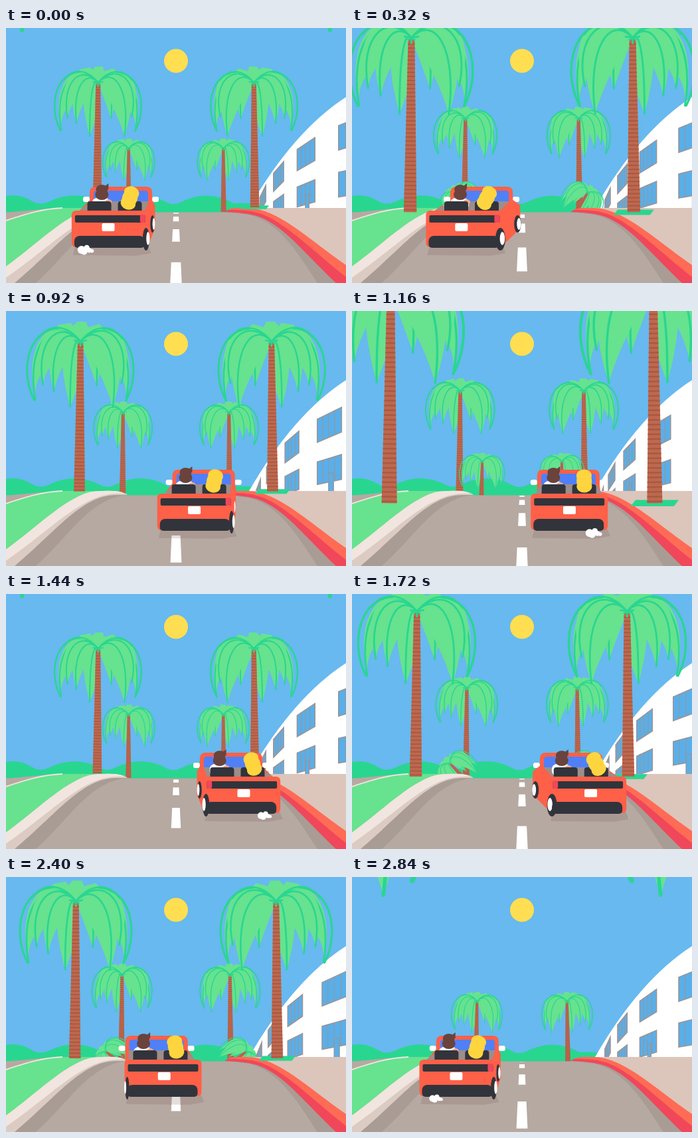
An HTML page with a canvas that plays this animation: 512 px wide and 384 px high, repeating every 2.88 s.

```html
<!DOCTYPE html>
<html lang="en">
<head>
<meta charset="utf-8">
<title>Palm drive</title>
<style>
  html, body { margin: 0; width: 100%; height: 100%; overflow: hidden; background: #67b9ef; }
  canvas { display: block; width: 512px; height: 384px; }
</style>
</head>
<body>
<canvas id="stage" width="512" height="384"></canvas>
<script>
const ctx = document.getElementById('stage').getContext('2d');
const LOOP = 2880, STEP = 40, TREE_GAP = 720, OLDEST = 2300;
const MID = 256, TAU = Math.PI * 2;
const SKY = '#67b9ef', GREEN = '#67e28f', DEEP = '#29d690', ROAD = '#b6a9a2', SHADE = '#a99c95';
const RED = '#ff6048', CRIMSON = '#f0475a', DARK = '#32343c', HAIR = '#6a433c', BLOND = '#ffd53f';

function shape(d, fill, stroke, width = 1) {
  const p = new Path2D(d);
  if (fill) { ctx.fillStyle = fill; ctx.fill(p); }
  if (stroke) { ctx.strokeStyle = stroke; ctx.lineWidth = width; ctx.stroke(p); }
}
const poly = (points, ...paint) => shape('M' + points.join('L') + 'Z', ...paint);
function oval(x, y, rx, ry, fill, turn = 0) {
  ctx.beginPath();
  ctx.ellipse(x, y, rx, ry, turn, 0, TAU);
  ctx.fillStyle = fill;
  ctx.fill();
}
function box(x, y, w, h, r, fill) {
  ctx.beginPath();
  ctx.roundRect(x, y, w, h, r);
  ctx.fillStyle = fill;
  ctx.fill();
}

// Tip and fullness of each leaf, for a crown one unit wide.
const LEAVES = [
  [-.41, .54, .01], [.42, .54, .01], [-.34, .40, .05], [.38, .38, .05],
  [-.24, .46, .06], [.15, .40, .07], [-.09, .60, .11], [.30, .60, .10]
];

function leaf([x, y, belly]) {
  const side = Math.sign(x), b = side * belly, rise = .04 + Math.abs(x) * .6;
  const rib = (f, dx, dy) => `C${x * .6 + f * b} ${-rise + dy} ${x * 1.28 + f * b + dx} ${y * .3 - rise * .6 + dy} ${x} ${y}`;
  shape(`M0 0${rib(1, 0, 0)}C${x * 1.1 - b} ${y * .6} ${x * .6 - b} ${y * .15} 0 0Z`, GREEN);
  shape(`M0 0${rib(0, -side * .02, .03)}`, null, DEEP, .015);
}

function crown() {
  shape('M-.24-.1L-.2-.15L-.09-.17L-.07-.14L-.03-.18L.05-.18L.07-.13L.17-.16L.26-.08L.14.08L-.14.08Z', GREEN);
  ctx.lineCap = 'round';
  LEAVES.forEach(leaf);
  for (const s of [-1, 1]) {
    shape(`M0 0C${s * .12}-.15 ${s * .28}-.17 ${s * .38}-.03`, null, DEEP, .014);
    shape(`M${s * .2}-.12C${s * .5}-.1 ${s * .55} .3 ${s * .42} .54`, null, DEEP, .018);
  }
}

// A palm springs up behind the crest, then grows with perspective as it nears.
function growth(age) {
  const width = 145000 / (2522 - age);
  const far = Math.max(0, 1440 - age), near = Math.max(0, age - 1440);
  const swing = 47 * Math.exp((303 - age) / 165) * Math.cos(TAU * (age - 303) / 530);
  return {
    width,
    topX: -.875 * width - swing,
    topY: 243 - 1.2 * width + far ** 2 / 15000,
    footX: -.885 * width - swing / 2,
    footY: 270 + far / 100 + (near / 164) ** 3
  };
}

function palm(age, side) {
  const { width: w, topX, topY, footX, footY } = growth(age);
  ctx.save();
  ctx.translate(MID, 0);
  ctx.scale(side, 1);
  if (side < 0 && age > 1400) {
    const pw = w * .16, ph = w * .021;
    poly([[footX - pw, footY - ph], [footX + pw * .8, footY - ph], [footX + pw, footY + ph], [footX - pw * .8, footY + ph]], DEEP);
  }
  ctx.translate(topX, topY);
  ctx.rotate(Math.atan2(topX - footX, footY - topY));
  ctx.save();
  ctx.scale(w, w);
  crown();
  ctx.restore();

  const length = Math.hypot(topX - footX, footY - topY), half = k => w * (.026 + .025 * k);
  shape(`M${-half(0)} ${w * .03}Q0 ${-w * .03} ${half(0)} ${w * .03}L${half(1)} ${length}H${-half(1)}Z`, '#bd694f');
  ctx.lineCap = 'butt';
  for (let d = w * .05; d < length; d += w * .032) {
    shape(`M${-half(d / length)} ${d}H${half(d / length)}`, null, '#ab5842', w * .011);
  }
  ctx.scale(w, w);
  for (let i = -2; i <= 2; i++) shape(`M0 0L${i * .03} ${.05 - Math.abs(i) * .03}`, null, DEEP, .014);
  ctx.restore();
}

function palms(t, from, to) {
  for (let age = t % TREE_GAP + 3 * TREE_GAP; age > from; age -= TREE_GAP) {
    if (age >= to) continue;
    palm(age, 1);
    palm(age, -1);
  }
}

function building(t) {
  const hall = 'M366 271Q433 155 512 104V271Z', frame = '#9d9394';
  shape(hall, '#fff');
  ctx.save();
  ctx.clip(new Path2D(hall));
  const phase = t / 360 + .03, column = Math.floor(phase);
  const at = (u, y, drop) => [355.3 + 46.7 * 1.75 ** u, y - drop * u];
  for (let n = -2; n <= 2; n++) {
    const left = n + phase - column, right = left + .5;
    const pane = (top, topDrop, end, endDrop) => {
      const upper = u => at(u, top, topDrop), lower = u => at(u, end, endDrop);
      poly([upper(left), upper(right), lower(right), lower(left)], '#59afe9', frame, 1.5);
      for (let k = 1; k < 4; k++) shape(`M${upper(left + k / 8)}L${lower(left + k / 8)}`, null, frame);
    };
    pane(220, 36, 247, 31);
    pane(262, 22, 285, 15);
    if ((n - column) % 2) {
      const [x, y] = at(left + .25, 266, 12), [x2] = at(left + .35, 0, 0);
      shape(`M${x} 271V${y}H${x2}V271`, '#59afe9', frame, 1.3);
    }
  }
  ctx.restore();
}

function backdrop() {
  ctx.fillStyle = SKY;
  ctx.fillRect(0, 0, 512, 384);
  oval(256, 49.5, 18, 18, '#ffde51');
  shape('M0 253Q20 249 38 260Q50 268 64 262Q103 242 142 262Q153 268 165 261Q205 242 243 263Q253 268 264 262Q303 242 343 264Q365 262 400 270V278H0Z', DEEP);
}

function ground(t) {
  ctx.fillStyle = ROAD;
  ctx.fillRect(0, 277.5, 512, 107);
  shape('M0 278L75 271H90L0 294Z', ROAD);
  shape('M0 291C30 280 55 272 85 271H150L125 276C85 288 45 330 0 362Z', GREEN);
  shape('M0 290C30 280 55 272 85 271', null, '#f1e5df', 2);
  // left kerb
  shape('M13 384C75 332 115 277 165 277H183C125 282 95 340 45 384Z', SHADE);
  shape('M0 359C45 327 85 285 125 273Q140 270 165 271Q180 273 183 277H165C115 277 75 332 13 384H0Z', '#dccbc3');
  shape('M0 359C45 327 85 285 125 273Q140 270 165 271Q175 272 178 275C120 270 80 320 0 376Z', '#f1e5df');
  // right pavement and kerb
  shape('M352 271H512V384H497L400 290Z', '#dcc5bb');
  shape('M329 277L365 281C412 292 440 340 469 384H500C430 315 410 280 350 274Z', SHADE);
  shape('M329 277Q337 271 352 271Q375 271 395 279C430 295 465 330 512 364V384H497C455 345 425 305 388 287Q370 278 329 277Z', CRIMSON);
  shape('M333 274Q340 271 352 271H364Q380 271 400 280C438 298 470 328 512 357V375C465 338 430 302 394 284Q370 272 333 274Z', '#ff6b55');

  // lane dashes rush outward from the vanishing point
  const half = y => 3.8 + (y - 278) * .046;
  for (let n = -2; n < 3; n++) {
    const gap = 11.6 * 2.63 ** (n + t * 15 / LOOP % 1);
    const top = Math.max(278, 272.4 + gap), end = 272.4 + gap * 1.62;
    if (end > top) poly([[MID - half(top), top], [MID + half(top), top], [MID + half(end), end], [MID - half(end), end]], '#fff');
  }
}

function puff(t, start, plate, side) {
  const k = (t - start + LOOP) % LOOP / 335;
  if (k >= 1) return;
  const size = Math.sin(Math.PI * k ** .55), x = plate + side * (27 + 31 * k), y = 333 + 4 * k;
  for (let i = 0; i < 5; i++) {
    const r = (6 - i * .8) * size;
    oval(x + (i * 4 - 6) * size, y + Math.sin(i * 2.2) * 3 * size, r, r, '#fff');
  }
}

function car(t) {
  const swing = TAU * t / LOOP;
  const plate = 262 - 102 * Math.cos(swing) - 28 * Math.sin(swing) - 6 * Math.cos(2 * swing);
  const yaw = 31 * Math.cos(swing - 4.05);
  const cab = plate - yaw, rear = plate - yaw * .15, seat = (plate + cab) / 2;
  const side = yaw > 0 ? -1 : 1, turn = Math.abs(yaw), nose = 40 + turn * .6;

  poly([[rear - 53, 329], [rear + 57, 328], [rear + 62, 339], [rear + 40, 343], [rear - 56, 342]], 'rgba(120,90,85,.2)');
  for (const s of [-1, 1]) box(cab + s * 52 - 5, 254, 10, 8, 3, '#fff');
  box(cab - 47, 239, 94, 40, 8, RED);
  box(cab - 41, 245, 82, 18, 4, '#5080f8');
  for (const s of [-1, 1]) {
    poly([[rear + s * 48, 277], [cab + s * 46, 258], [cab + s * nose, 267], [cab + s * nose, 302], [rear + s * 57, 328]], RED);
  }
  poly([[cab - 42, 261], [cab + 42, 261], [rear + 51, 278], [rear - 51, 278]], '#9c8e8a');

  const head = seat - 23 - yaw * .2;
  box(head - 15, 256, 28, 18, 8, '#fff');
  oval(head + 10, 262, 5, 4, '#f7a58d');
  oval(head, 251, 10, 8, HAIR);
  oval(head, 243, 9, 7, HAIR);
  poly([[head + 2, 240], [head + 10, 234], [head + 10, 243]], HAIR);
  for (const s of [-1, 1]) box(seat + s * 23 - 18, 261, 36, 20, 4, DARK);
  const lean = -yaw * Math.PI / 180;
  for (let k = -1; k <= 1; k++) oval(seat + 23 - Math.sin(lean) * 8 * k, 256 + 8 * k, 11.5, k ? 9.5 : 14, BLOND, lean);

  if (turn > 12) {
    oval(cab + side * (nose - 4), 295, turn * .17, 13, DARK);
    oval(cab + side * (nose - 2), 295, turn * .1, 9, '#fff');
  }
  box(rear - 58, 275, 116, 55, 6, RED);
  box(rear - 53, 282, 106, 11, 2, DARK);
  if (turn > 12) box(rear + side * 49 - 4, 281, 8, 12, 2, CRIMSON);
  box(plate - 9.5, 294, 19, 12, 2, '#fff');
  if (turn > 4) {
    const rx = Math.min(7.5, turn * .27);
    oval(rear + side * 54, 318, rx, 17, DARK);
    oval(rear + side * 57, 317, rx * .5, 10, '#fff');
  }
  box(rear - 54, 313, 106, 18, [8, 8, 5, 5], DARK);

  puff(t, 2800, plate, -1);
  puff(t, 1060, plate, 1);
  puff(t, 1395, plate, 1);
}

function draw(t) {
  backdrop();
  building(t);
  palms(t, 200, 1400);
  ground(t);
  palms(t, 1400, OLDEST);
  car(t);
}

const begin = performance.now();
function tick() {
  draw(Math.floor((performance.now() - begin) % LOOP / STEP) * STEP);
  requestAnimationFrame(tick);
}
tick();
</script>
</body>
</html>
```
